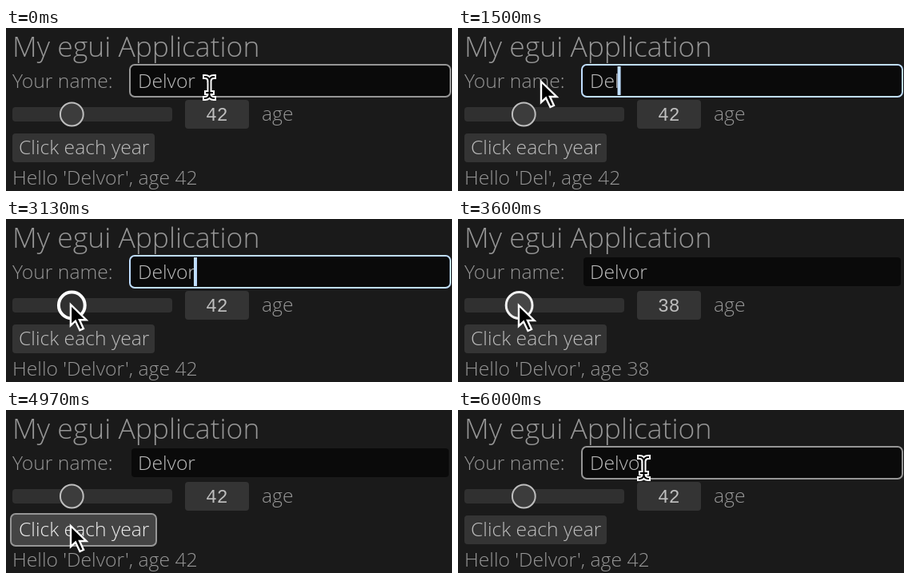
Write an HTML page with a canvas that moves like this. It is 558x204 px and loops after 6030 ms.

```html
<!DOCTYPE html>
<html lang="en">
<head>
<meta charset="utf-8">
<style>
  html, body { margin: 0; width: 558px; height: 204px; overflow: hidden; background: #1a1a1a; }
  canvas { display: block; }
</style>
</head>
<body>
<canvas id="stage" width="558" height="204"></canvas>
<script>
const ctx = document.getElementById('stage').getContext('2d');
const LOOP = 6030;
const NAME = 'Delvor';
const SANS = '"Open Sans", "Noto Sans", sans-serif';
const BODY = `350 24.7px ${SANS}`;
const HEADING = `350 35.5px ${SANS}`;
const MONO = '23px "Liberation Mono", monospace';
const DIM = '#969696', MID = '#bebebe', BLUE = '#c0deff';

// Pointer path: time, x, y
const path = [
  [0, 254, 73], [30, 254, 73], [100, 265, 68], [270, 265, 68], [530, 103, 65],
  [2230, 103, 65], [2500, 98, 93], [2730, 81, 105], [3100, 81, 105], [3270, 75, 106],
  [3800, 75, 106], [4070, 80, 143], [5600, 80, 143], [6000, 232, 71], [LOOP, 232, 71]
];
const typed = [1000, 1330, 1500, 1630, 1730, 1870];
const clicks = [[4100, 4200], [4330, 4430], [4600, 4730], [4870, 4970]];

const within = (v, a, b) => v >= a && v < b;

function pointerAt(t) {
  const i = path.findIndex(p => p[0] > t);
  const [t0, x0, y0] = path[i - 1], [t1, x1, y1] = path[i];
  const k = (t - t0) / (t1 - t0);
  return [x0 + (x1 - x0) * k, y0 + (y1 - y0) * k];
}

function ageAt(t) {
  if (t < 3130) return 42;
  const drag = Math.min(1, (t - 3130) / 140);
  return Math.round(42 - 4 * drag) + clicks.filter(c => t >= c[1]).length;
}

function text(str, x, y, color = DIM, font = BODY) {
  ctx.font = font;
  ctx.fillStyle = color;
  ctx.fillText(str, x, y);
}

function box(x, y, w, h, r, fill, stroke, width = 2) {
  ctx.beginPath();
  ctx.roundRect(x, y, w, h, r);
  ctx.fillStyle = fill;
  ctx.fill();
  if (!stroke) return;
  ctx.strokeStyle = stroke;
  ctx.lineWidth = width;
  ctx.stroke();
}

function field(t, x, hover) {
  const focus = within(t, 270, 3600);
  if (focus) box(155, 46, 401, 40, 6, '#0a0a0a', BLUE, 2);
  else if (hover) box(155, 46, 401, 40, 6, '#0a0a0a', '#969696');
  else box(157, 48, 397, 36, 4, '#0a0a0a');

  const count = within(t, 1000, 1870) ? typed.filter(v => t >= v).length : NAME.length;
  const name = NAME.slice(0, count);
  ctx.font = BODY;
  const edge = i => 165 + ctx.measureText(NAME.slice(0, i)).width;
  let caret = count;
  if (within(t, 270, 1000)) {
    while (caret > 0 && x < (edge(caret) + edge(caret - 1)) / 2) caret--;
    ctx.fillStyle = '#005c80';
    ctx.fillRect(edge(caret), 48, edge(count) - edge(caret), 36);
  }
  text(name, 165, 75, MID);
  if (focus) {
    ctx.fillStyle = BLUE;
    ctx.fillRect(edge(caret) - 2, 48, 4, 36);
  }
  return name;
}

function slider(age, hover, held) {
  box(8, 99, 200, 18, 4, '#303030');
  ctx.beginPath();
  ctx.arc(22.4 + age * 171.2 / 120, 108, hover || held ? 16.4 : 14.4, 0, 7);
  ctx.fillStyle = held ? '#303030' : hover ? '#464646' : '#3c3c3c';
  ctx.strokeStyle = held ? '#fff' : hover ? '#f0f0f0' : MID;
  ctx.lineWidth = held ? 4 : hover ? 3 : 2;
  ctx.fill();
  ctx.stroke();
  box(224, 90, 80, 36, 4, '#343434');
  text(age, 250, 116, MID, MONO);
}

function button(hover, held) {
  if (held) box(6, 130, 182, 40, 6, '#2a2a2a', '#fff');
  else if (hover) box(6, 130, 182, 40, 6, '#444', '#969696');
  else box(8, 132, 178, 36, 4, '#343434');
  text('Click each year', 16, 158, held ? '#fff' : hover ? '#f0f0f0' : MID);
}

const arrow = new Path2D('M1 2V28L7 22.5L12.5 34L17 32L12 21H20.5Z');
const beam = new Path2D('M-5-12Q0-12 0.5-7V10Q0 15-5 15M6-12Q1-12 0.5-7M0.5 10Q1 15 6 15M-3 8H4');

function pointer(x, y, isText) {
  ctx.save();
  ctx.translate(x, y);
  ctx.lineCap = 'square';
  ctx.strokeStyle = '#fff';
  if (isText) {
    ctx.lineWidth = 6;
    ctx.stroke(beam);
    ctx.strokeStyle = '#000';
    ctx.lineWidth = 2;
    ctx.stroke(beam);
  } else {
    ctx.fillStyle = '#000';
    ctx.lineWidth = 2.4;
    ctx.fill(arrow);
    ctx.stroke(arrow);
  }
  ctx.restore();
}

function draw(now) {
  const t = now % LOOP;
  const [x, y] = pointerAt(t);
  const age = ageAt(t);
  const overField = x >= 155 && within(y, 46, 86);
  const overSlider = within(x, 8, 208) && within(y, 90, 126);
  const overButton = within(x, 8, 186) && within(y, 132, 168);

  ctx.fillStyle = '#1a1a1a';
  ctx.fillRect(0, 0, 558, 204);
  text('My egui Application', 8, 36, DIM, HEADING);
  text('Your name:', 8, 75);
  const name = field(t, x, overField);
  slider(age, overSlider, within(t, 2870, 3600));
  text('age', 320, 116);
  button(overButton, clicks.some(c => within(t, ...c)));
  text(`Hello '${name}', age ${age}`, 8, 196);
  pointer(x, y, overField);
  requestAnimationFrame(draw);
}
requestAnimationFrame(draw);
</script>
</body>
</html>
```
